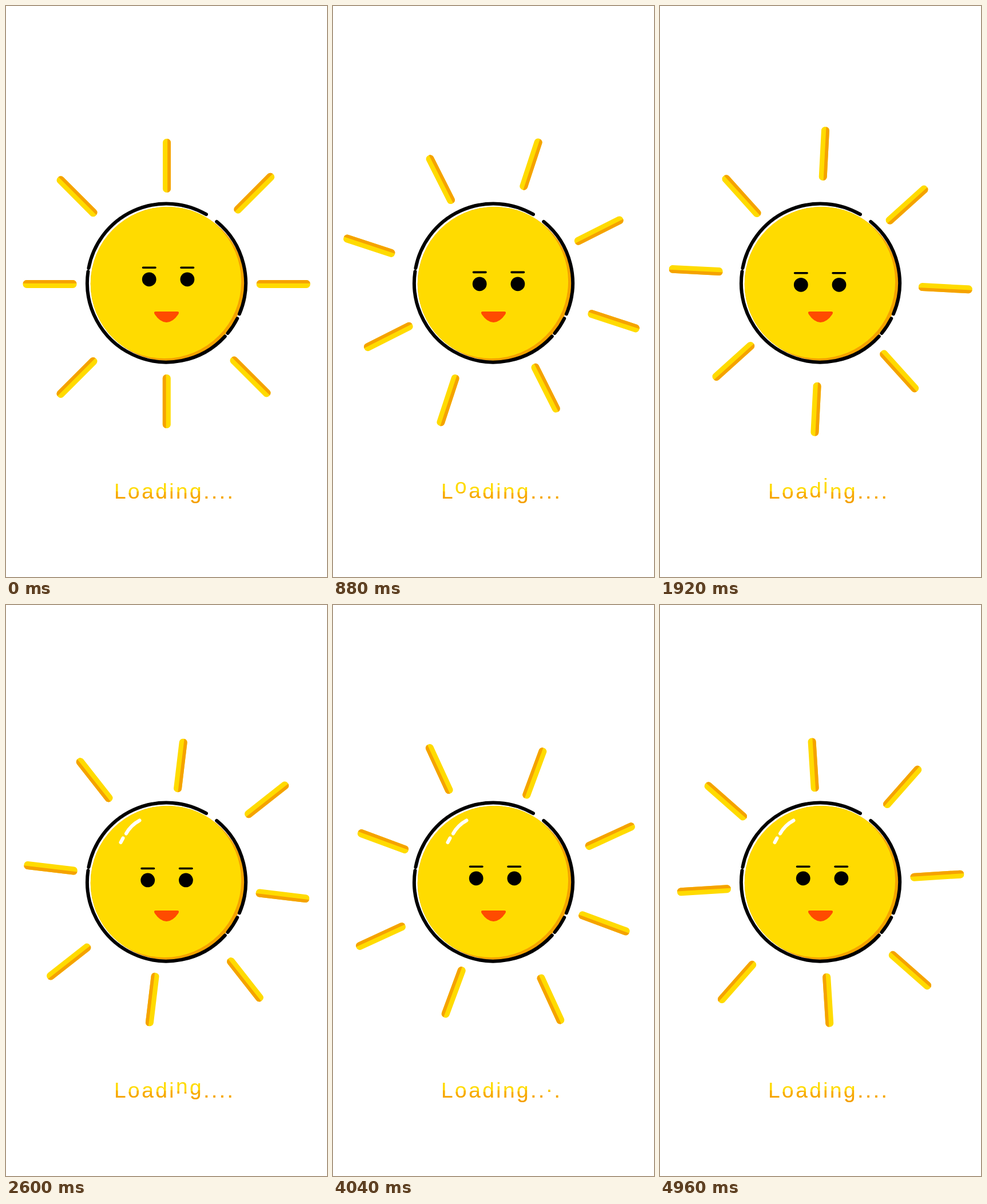
Animation of 561x998 px, one loop 5000 ms. Source, as an HTML page:

```html
<!DOCTYPE html>
<html lang="en">
<head>
<meta charset="utf-8">
<title>Sunny loader</title>
<style>
  html, body { margin: 0; width: 100%; height: 100%; overflow: hidden; background: #fff; }
  svg { display: block; width: 100vw; height: 100vh; }
  text { font: 37px "Liberation Sans", Arial, sans-serif; }
</style>
</head>
<body>
<svg viewBox="0 0 561 998">
  <defs>
    <clipPath id="bar"><rect x="-47" y="-7" width="94" height="14" rx="6.5"/></clipPath>
    <clipPath id="disc"><circle cx="282.3" cy="485.5" r="134.5"/></clipPath>
    <clipPath id="low"><path id="wave"/></clipPath>
    <linearGradient id="amber" gradientUnits="userSpaceOnUse" x1="0" y1="846" x2="0" y2="869">
      <stop offset="0" stop-color="#f9b208"/>
      <stop offset="1" stop-color="#f49a06"/>
    </linearGradient>
  </defs>

  <g id="rays"></g>

  <g clip-path="url(#disc)">
    <rect x="140" y="343" width="285" height="285" fill="#f5a200"/>
    <circle cx="276.6" cy="481.5" r="134.5" fill="#ffdb00"/>
    <rect x="140" y="343" width="0" height="0"/>
  </g>
  <g id="ring" fill="none" stroke="#000" stroke-width="6" stroke-linecap="round"></g>
  <g id="shine" fill="none" stroke="#fff" stroke-width="6" stroke-linecap="round">
    <path d="M233.5 376.5Q218 385 210 399.5M204.5 407.5L200.5 415"/>
  </g>

  <g id="eyes">
    <circle cx="250.2" cy="477.8" r="12.4"/>
    <circle cx="316.9" cy="477.8" r="12.4"/>
    <path d="M239.5 457.3H261M306 457.3H327.5" stroke="#000" stroke-width="3.6" stroke-linecap="round"/>
  </g>
  <path fill="#ff4b00" d="M262 534H299Q304 534 301 539Q292 552.5 280.5 553Q269 552.5 260 539Q257 534 262 534Z"/>

  <g id="yellow" fill="#ffdb00"></g>
  <g clip-path="url(#low)"><g id="orange" fill="url(#amber)"></g></g>
</svg>
<script>
const LOOP = 5000, STEP = 40;
const CX = 280.6, CY = 485;
const $ = id => document.getElementById(id);

function add(parent, tag, attrs) {
  const el = document.createElementNS(parent.namespaceURI, tag);
  for (const k in attrs) el.setAttribute(k, attrs[k]);
  return parent.appendChild(el);
}

// Ray centre, direction, shaded side (1 = clockwise)
const RAYS = [
  [281, 279, -90, 1], [433.8, 327.2, -45, -1], [484.7, 486, 0, -1], [427, 648, 45, -1],
  [280.8, 691, 90, 1], [124, 649.4, 135, 1], [76.5, 486, 180, 1], [124, 332.8, 225, 1]
];
for (const [x, y, angle, side] of RAYS) {
  const ray = add($('rays'), 'g', {
    transform: `translate(${x} ${y}) rotate(${angle})`, 'clip-path': 'url(#bar)'
  });
  add(ray, 'rect', { x: -48, y: -8, width: 96, height: 16, fill: '#ffdb00' });
  add(ray, 'rect', { x: -48, y: side > 0 ? 1.2 : -8, width: 96, height: 6.8, fill: '#f5a200' });
}

// Outline arcs in degrees
const onRing = deg => {
  const a = deg * Math.PI / 180;
  return `${280.5 + 138.5 * Math.cos(a)} ${484 + 138.5 * Math.sin(a)}`;
};
for (const [a, b] of [[-50.7, 23.1], [26.7, 39.4], [42.4, 188.3], [190.7, 300.1]])
  add($('ring'), 'path', { d: `M${onRing(a)}A138.5 138.5 0 0 1 ${onRing(b)}` });

// Wavy edge between the two text colours
let edge = 'M180 890';
for (let x = 180; x <= 410; x += 3) edge += `L${x} ${849.5 + 1.6 * Math.sin(x / 8)}`;
$('wave').setAttribute('d', edge + 'L410 890Z');

const BASE = 861, SPACING = 3.5;
const advance = c => 37 * (c === '.' ? 0.278 : c === 'i' ? 0.222 : 0.556) + SPACING;
const letters = [];
let penX = 189;
for (const c of 'Loading....') {
  letters.push(['yellow', 'orange'].map(id => {
    const el = add($(id), 'text', { x: penX, y: BASE });
    el.textContent = c;
    return el;
  }));
  penX += advance(c);
}

function lift(d) {
  return Math.abs(d) < 1.1 ? 10 * Math.cos(Math.PI * d / 2.2) ** 2 : 0;
}

// Time, x, y of the gaze
const GAZE = [[0, 0, 0], [1040, 7.1, 9.5], [2200, -7.4, 9.5], [2800, 0, 0], [LOOP, 0, 0]];
function gaze(t) {
  const i = GAZE.findIndex(k => k[0] > t);
  const [t0, x0, y0] = GAZE[i - 1], [t1, x1, y1] = GAZE[i];
  const p = (t - t0) / (t1 - t0);
  return [x0 + (x1 - x0) * p, y0 + (y1 - y0) * p];
}

function draw(t) {
  $('rays').setAttribute('transform', `rotate(${t * 0.36 / 5.01} ${CX} ${CY})`);
  $('eyes').setAttribute('transform', `translate(${gaze(t)})`);
  $('shine').setAttribute('visibility', t >= 2240 ? 'visible' : 'hidden');
  const peak = t * 0.00247 - 1;
  letters.forEach((pair, i) => {
    const y = t ? BASE - lift(i - peak) : BASE;
    pair.forEach(el => el.setAttribute('y', y));
  });
}

const start = performance.now();
function tick() {
  const t = (performance.now() - start) % LOOP;
  draw(Math.floor((t + 0.5) / STEP) * STEP % LOOP);
  requestAnimationFrame(tick);
}
tick();
</script>
</body>
</html>
```
